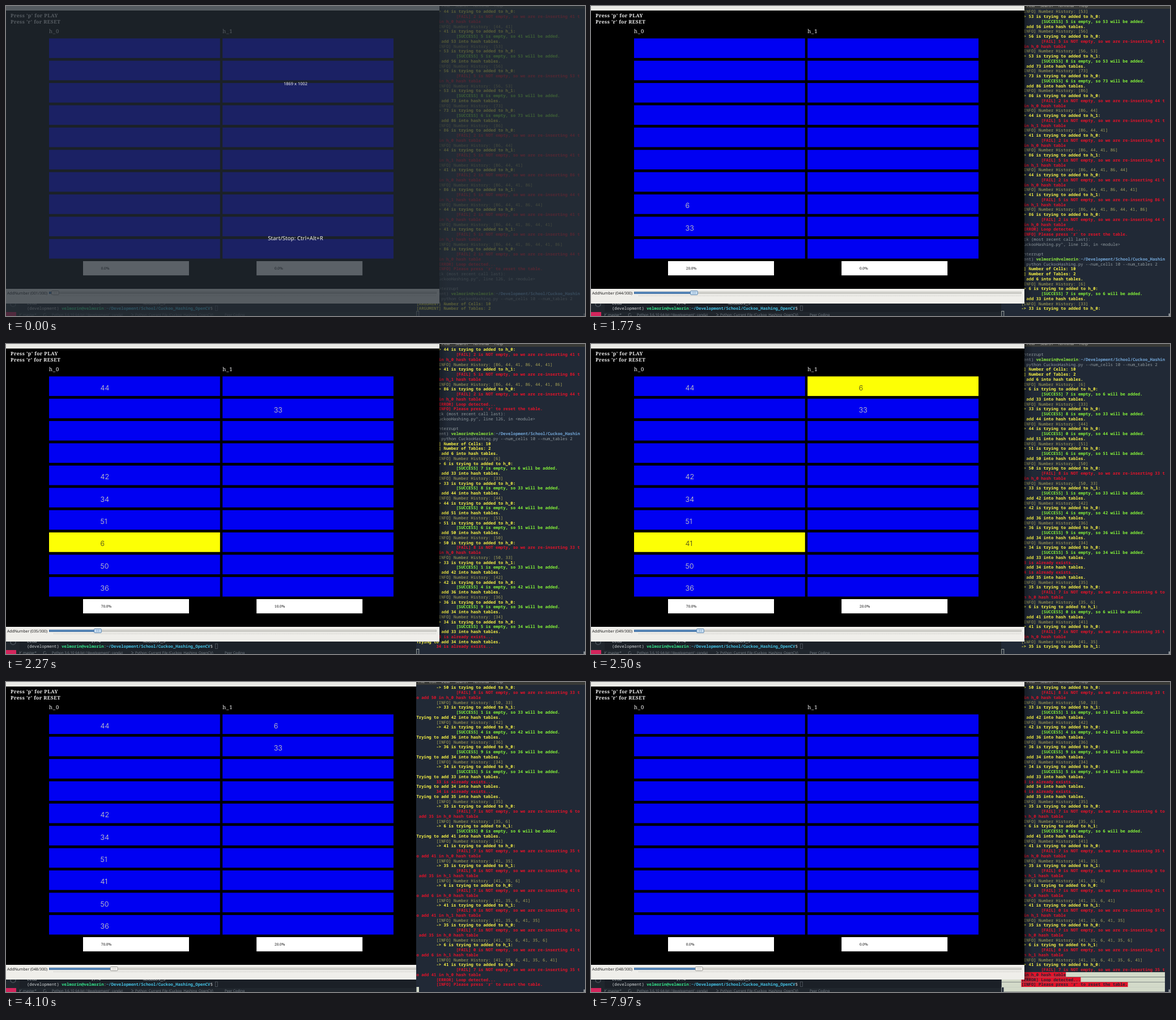
Write an HTML page with a canvas that moves like this. It is 1022 px wide and 548 px high and loops after 8000 ms.

```html
<!DOCTYPE html>
<html lang="en">
<head>
<meta charset="utf-8">
<title>Cuckoo hashing</title>
<style>
  html, body { margin: 0; width: 100%; height: 100%; overflow: hidden; background: #000; }
  canvas { display: block; }
</style>
</head>
<body>
<canvas id="stage" width="1022" height="548"></canvas>
<script>
const ctx = document.getElementById('stage').getContext('2d');
const LOOP = 8000, COLS = 66, ROWS = 62;
const TERM = { x: 724.5, y: 5.3, cw: 4.375, ch: 8.75, bg: '#212936', pale: '#d3dac9' };
const MONO = '"Noto Sans Mono", monospace';
const SANS = '"Noto Sans", sans-serif';
const SERIF = '"Noto Serif", serif';
const INK = {
  plain: '#909a9f', dim: '#aaa658', bold: '#f8f346', ok: '#84f23a',
  bad: '#e3132a', user: '#8be63c', path: '#73a7d8'
};
const BOLD = { bold: 1, ok: 1, bad: 1, user: 1, path: 1 };

// ---- Simulation: builds the terminal log and the cell events ----
const log = [], events = [];

function say(t, ink, text, indent = 0) {
  const line = ' '.repeat(indent) + text;
  for (let i = 0; i < line.length; i += COLS) log.push({ t, spans: [[line.slice(i, i + COLS), ink]] });
}

function insert(n, hash, tables, times) {
  let t = times.shift();
  say(t + 15, 'bold', `Trying to add ${n} into hash tables.`);
  if (tables.some(col => col.includes(n))) return say(t + 15, 'bad', `${n} is already exists...`, 8);
  const seen = [];
  for (let k = 0; k < 7; k++) {
    if (k) t = times.shift();
    const side = k % 2, slot = hash[side][n], out = tables[side][slot], next = times[0];
    seen.push(n);
    say(t + 15, 'dim', `[INFO] Number History: [${seen.join(', ')}]`, 8);
    say(t + 15, 'bold', `-> ${n} is trying to added to h_${side}:`, 8);
    tables[side][slot] = n;
    events.push({ t, side, slot, lit: true }, { t: t + 40, side, slot, value: n });
    if (out === undefined) {
      say(next + 15, 'ok', `[SUCCESS] ${slot} is empty, so ${n} will be added.`, 16);
      events.push({ t: t + 50, side, slot, lit: false });
      return;
    }
    say(next + 15, 'bad', `[FAIL] ${slot} is NOT empty, so we are re-inserting ${out} to add ${n} in h_${side} hash table`, 16);
    events.push({ t: next + 35, side, slot, lit: false });
    n = out;
  }
  say(times[0] + 15, 'bad', '[ERROR] Loop detected...', 8);
  say(times[0] + 15, 'bad', "[INFO] Please press 'r' to reset the table.", 8);
}

function session(numbers, hash, tables, times) {
  for (const n of numbers) insert(n, hash, tables, times);
}

// Earlier run, already in the scrollback
session([44, 53, 56, 73, 86],
  [{ 41: 2, 44: 2, 53: 5, 56: 5, 73: 6, 86: 2 }, { 41: 5, 44: 5, 53: 8, 86: 5 }],
  [[, , 41], []], Array(20).fill(-99));
events.length = 0;
say(-9, 'plain', '^CTraceback (most recent call last):');
say(-9, 'plain', 'File "CuckooHashing.py", line 126, in <module>', 2);
say(-9, 'plain', 'run()', 4);
say(-9, 'plain', 'KeyboardInterrupt');
log.push({ t: -9, spans: [['(development) ', 'plain'], ['velmorin@velmorin', 'user'], [':', 'plain'],
  ['~/Development/School/Cuckoo_Hashin', 'path']] });
log.push({ t: -9, spans: [['g_OpenCV', 'path'], ['$ python CuckooHashing.py --num_cells 10 --num_tables 2', 'plain']] });
say(-9, 'bold', '[ARGUMENT] Number of Cells: 10');
say(-9, 'bold', '[ARGUMENT] Number of Tables: 2');

// Current run
session([6, 33, 44, 51, 50, 42, 36, 34, 33, 34, 35, 41],
  [{ 6: 7, 33: 8, 44: 0, 51: 6, 50: 8, 42: 4, 36: 9, 34: 5, 35: 7, 41: 7 }, { 33: 1, 6: 0, 35: 0, 41: 0 }],
  [[], []],
  [1000, 1560, 1790, 1840, 1900, 1960, 2020, 2080, 2140, 2190, 2225, 2270, 2340,
    2410, 2480, 2620, 2750, 2880, 3010, 3140, 3235]);
events.sort((a, b) => a.t - b.t);

// ---- Timelines ----
const SLIDER = [[800, 1], [1000, 6], [1560, 33], [1770, 44], [1840, 51], [1900, 50], [2030, 40], [2080, 36],
  [2140, 34], [2190, 33], [2225, 34], [2270, 35], [2410, 41], [2490, 49], [3299, 49], [3300, 48]];

function sliderAt(t) {
  const i = SLIDER.findIndex(k => k[0] > t);
  if (i === 0) return 1;
  if (i < 0) return 48;
  const [t0, a] = SLIDER[i - 1], [t1, b] = SLIDER[i];
  return Math.round(a + (b - a) * (t - t0) / (t1 - t0));
}

// Start of the mouse selection; it always reaches to the last row
function selectionAt(t) {
  if (t < 4870) return null;
  if (t < 4930) return { row: 61, col: 0 };
  if (t < 5230) return { row: 60, col: t < 5000 ? 64 : 60 };
  if (t < 5730) return { row: 60, col: Math.round(58 - 47 * Math.floor((t - 5230) / 50) / 10) };
  if (t < 5800) return { row: 60, col: 11 };
  if (t < 5850) return { row: 60, col: 3 };
  if (t < 5900) return { row: 59, col: 20 };
  if (t < 6070) return { row: 59, col: 0 };
  return { row: 58, col: t < 6370 ? 4 : t < 6500 ? 2 : 0 };
}

function cursorOn(t) {
  return t < 4730 || (t >= 5330 && t < 5900) || t >= 6500;
}

// ---- Drawing ----
function box(x, y, w, h, color) {
  ctx.fillStyle = color;
  ctx.fillRect(x, y, w, h);
}

function text(str, x, y, font, color, spacing = 0) {
  ctx.font = font;
  ctx.letterSpacing = spacing + 'px';
  ctx.fillStyle = color;
  ctx.fillText(str, x, y);
}

function monoSpans(spans, x, y, palette) {
  for (const [str, ink] of spans) {
    text(str, x, y, `${BOLD[ink] ? 'bold ' : ''}7.29px ${MONO}`, palette[ink] || palette);
    x += str.length * TERM.cw;
  }
}

function drawEditor() {
  box(0, 518, 724, 30, '#1b2027');
  box(0, 518, 24, 23, '#20262d');
  ctx.strokeStyle = '#59626b';
  ctx.lineWidth = 1.2;
  ctx.beginPath();
  ctx.arc(12.5, 527, 4.5, 0, 7);
  ctx.stroke();
  text('Leda', 37, 528, `7.29px ${MONO}`, '#a9b0b5');
  text('17.4', 150, 528, `7.29px ${MONO}`, '#a9b0b5');
  text('Nodabbs_3', 242, 528, `7.29px ${MONO}`, '#a9b0b5');
  monoSpans([['(development) ', 'plain'], ['velmorin@velmorin', 'user'], [':', 'plain'],
    ['~/Development/School/Cuckoo_Hashing_OpenCV', 'path'], ['$', 'plain']], 37, 537,
    { plain: '#d2d6d8', user: '#35e58c', path: '#45c3e6' });
  ctx.lineWidth = 0.7;
  ctx.strokeRect(369.5, 530, 4, 8.5);
  box(0, 541, 724, 7, '#20262d');
  box(0, 541, 18, 7, '#d3255c');
  const small = `6.2px ${SANS}`, gray = '#747d85';
  ctx.strokeStyle = gray;
  ctx.beginPath();
  ctx.moveTo(24.5, 543.5); ctx.lineTo(24.5, 548);
  ctx.moveTo(27.5, 543.5); ctx.lineTo(24.5, 546.5);
  ctx.moveTo(71, 546); ctx.arc(68.5, 546, 2.5, 0, 5.5);
  ctx.moveTo(221, 543.5); ctx.lineTo(225, 546); ctx.lineTo(221, 548);
  ctx.stroke();
  text('master*', 30, 548, small, gray);
  text("Python 3.6.10 64-bit ('development': conda)", 81, 548, small, gray);
  text('Python: Current File (Cuckoo_Hashing_OpenCV)', 228, 548, small, gray);
  text('Peer Coding', 386, 548, small, gray);
}

function drawSelection(rows, sel, focused, t) {
  for (let r = sel.row; r < ROWS; r++) {
    const col = r === sel.row ? sel.col : 0;
    const x = TERM.x + col * TERM.cw, y = TERM.y + r * TERM.ch;
    ctx.save();
    ctx.beginPath();
    ctx.rect(x, y, TERM.x + COLS * TERM.cw - x, TERM.ch);
    ctx.clip();
    box(TERM.x, y, COLS * TERM.cw, TERM.ch, TERM.pale);
    if (rows[r]) {
      const [str, ink] = rows[r].spans[0];
      const pad = str.length - str.trimStart().length;
      box(TERM.x + pad * TERM.cw, y, (str.length - pad) * TERM.cw, TERM.ch, INK[ink]);
      monoSpans(rows[r].spans, TERM.x, y + 7, TERM.bg);
    }
    ctx.restore();
  }
}

function drawTerminal(t, focused) {
  box(724, 0, 298, 548, TERM.bg);
  box(724, 0, 298, 5, '#393a37');
  [['File', 728], ['Edit', 747], ['View', 768], ['Search', 793], ['Terminal', 824], ['Help', 862]]
    .forEach(([name, x]) => text(name, x, 2, `7px ${SANS}`, '#b5b4ac'));
  box(1019.5, 543.5, 2.5, 4.5, '#8d949a');

  const rows = log.filter(l => l.t <= t).slice(1 - ROWS);
  rows.forEach((l, r) => monoSpans(l.spans, TERM.x, TERM.y + r * TERM.ch + 7, INK));

  const sel = selectionAt(t), y = TERM.y + (ROWS - 1) * TERM.ch;
  if (sel) drawSelection(rows, sel);
  if (!focused) {
    if (sel) box(724, y, 5, 9, TERM.bg);
    ctx.strokeStyle = '#c3cac0';
    ctx.lineWidth = 0.8;
    ctx.strokeRect(724.8, y + 0.4, 4, 9);
  } else if (cursorOn(t)) {
    box(724.5, y, 4.5, 9, sel ? TERM.bg : TERM.pale);
  }
}

function cellsAt(t) {
  const cells = [0, 1].map(() => Array.from({ length: 10 }, () => ({ value: null, lit: false })));
  if (t >= 7970) return cells;
  for (const { t: when, side, slot, ...change } of events) {
    if (when <= t) Object.assign(cells[side][slot], change);
  }
  return cells;
}

function drawSlider(t) {
  const v = sliderAt(t), x = 84.6 + 2.21 * v, hover = t >= 800 && t < 3530;
  box(0, 500, 765, 26, '#efeeea');
  box(0, 500, 765, 1, '#f7f6f3');
  text(`AddNumber (${String(v).padStart(3, '0')}/300)`, 2, 510, `6.8px ${SANS}`, '#1d1d1d');
  box(76, 505, 684, 4, '#b1b0ab');
  box(76.6, 505.6, 682.8, 2.8, '#d5d4cf');
  box(76, 505, x - 76, 4, '#2f5c8c');
  box(76.6, 505.6, x - 77, 2.8, '#5b8bbd');
  ctx.strokeStyle = '#a5a49f';
  ctx.lineWidth = 0.8;
  ctx.setLineDash([1, 1.3]);
  ctx.beginPath();
  ctx.moveTo(84, 512.2);
  ctx.lineTo(760, 512.2);
  ctx.stroke();
  ctx.setLineDash([]);
  ctx.beginPath();
  ctx.roundRect(x - 6.5, 503.5, 13, 7, 1.5);
  ctx.fillStyle = hover ? '#c4daee' : '#eeede9';
  ctx.fill();
  ctx.strokeStyle = hover ? '#4f7ca8' : '#8e8d88';
  ctx.stroke();
  box(x - 2, 505, 0.8, 4, hover ? '#7fa3c5' : '#c0bfba');
  box(x + 1.2, 505, 0.8, 4, hover ? '#7fa3c5' : '#c0bfba');
}

function drawWindow(t) {
  box(0, 0, 765, 526, '#000');
  box(0, 0, 765, 8, '#e9e9e5');
  const label = `bold 8.6px ${SERIF}`;
  text("Press 'p' for PLAY", 8, 20, label, '#f4f4f4', 0.4);
  text("Press 'r' for RESET", 8, 31, label, '#f4f4f4', 0.4);
  cellsAt(t).forEach((col, side) => {
    const x = 76 + side * 306.2;
    text('h_' + side, x, 47.5, `9.5px ${SERIF}`, '#f4f4f4', 0.8);
    col.forEach(({ value, lit }, i) => {
      const y = 57.3 + 39.4 * i;
      box(x, y, 301.8, 34.6, lit ? '#fdff05' : '#0000f2');
      if (value !== null) text(value, x + 90.5, y + 24.2, `300 12.5px Inter, sans-serif`, lit ? '#3c3c20' : '#dedfc0', 0.1);
    });
    box(x + 60, 451, 187, 25.2, '#fff');
    const used = col.filter(c => c.value !== null).length;
    text(`${(used * 10).toFixed(1)}%`, x + 91.8, 465.8, `6.5px ${SERIF}`, '#111');
  });
  drawSlider(t);
}

function drawShadow() {
  const g = ctx.createLinearGradient(765, 0, 780, 0);
  g.addColorStop(0, 'rgba(0,0,0,.3)');
  g.addColorStop(1, 'rgba(0,0,0,0)');
  box(765, 0, 15, 526, g);
}

function drawIntro() {
  box(0, 0, 1022, 548, 'rgba(36,44,53,.75)');
  ctx.textAlign = 'center';
  text('1869 x 1002', 511, 139.5, `7.5px ${SANS}`, '#f2f2f2');
  text('Start/Stop: Ctrl+Alt+R', 511, 414, `9.8px ${SANS}`, '#f2f2f2');
  ctx.textAlign = 'left';
}

function draw(t) {
  ctx.textRendering = 'geometricPrecision';
  const termFront = t >= 4100 && t < 7030;
  drawEditor();
  if (termFront) {
    drawWindow(t);
    drawTerminal(t, true);
  } else {
    drawTerminal(t, false);
    drawShadow();
    drawWindow(t);
  }
  if (t < 100) drawIntro();
}

const start = performance.now();
function tick() {
  draw((performance.now() - start) % LOOP);
  requestAnimationFrame(tick);
}
tick();
</script>
</body>
</html>
```
